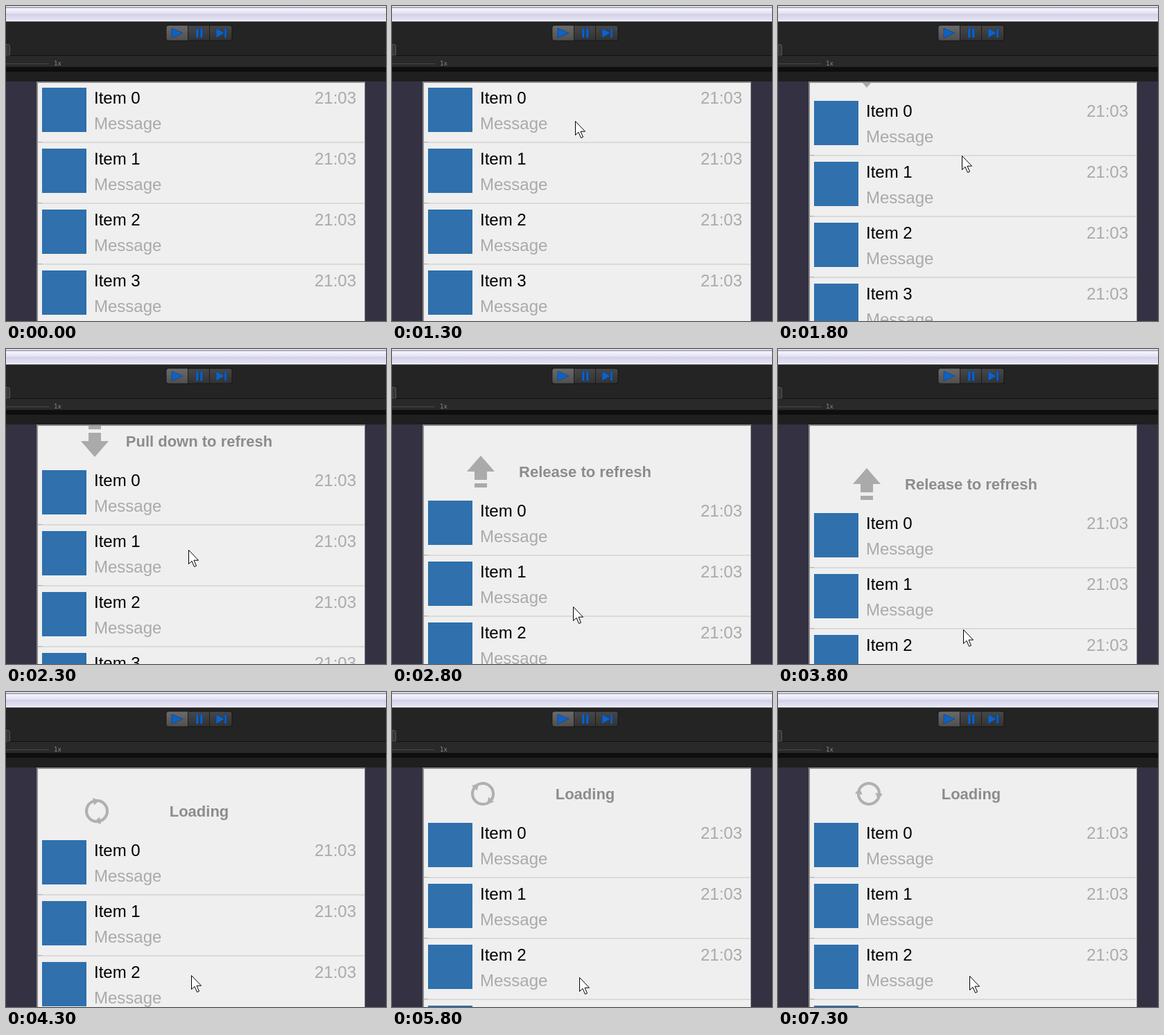
These frames come from a looping animation (548 px wide and 455 px high, 7.8 s). An HTML page:

```html
<!DOCTYPE html>
<html lang="en">
<head>
<meta charset="utf-8">
<title>Pull to refresh</title>
<style>
  html, body { margin: 0; width: 100%; height: 100%; overflow: hidden; background: #333142; }
  svg { display: block; }
  text { font-family: "Liberation Sans", Arial, sans-serif; }
  .row text { font-size: 24px; fill: #aaa; }
  .row .name { fill: #000; }
  .time { text-anchor: end; }
  .label { font-size: 22px; font-weight: bold; fill: #8c8c8c; text-anchor: middle; }
  .scale { font: 9px "DejaVu Sans Mono", monospace; fill: #8a8a8a; }
</style>
</head>
<body>
<svg width="548" height="455" viewBox="0 0 548 455">
  <defs>
    <linearGradient id="title" x2="0" y2="1">
      <stop offset="0" stop-color="#f6f6fc"/>
      <stop offset=".4" stop-color="#e4e3f2"/>
      <stop offset=".5" stop-color="#d3d1e8"/>
      <stop offset="1" stop-color="#e6e5f3"/>
    </linearGradient>
    <linearGradient id="button" x2="0" y2="1">
      <stop offset="0" stop-color="#484848"/>
      <stop offset="1" stop-color="#323232"/>
    </linearGradient>
    <linearGradient id="pressed" x2="0" y2="1">
      <stop offset="0" stop-color="#6a6a6a"/>
      <stop offset="1" stop-color="#505050"/>
    </linearGradient>
  </defs>

  <!-- Window title -->
  <g shape-rendering="crispEdges">
    <rect width="548" height="2" fill="#d8d8e6"/>
    <rect y="2" width="548" height="1" fill="#86869a"/>
    <rect y="3" width="548" height="18" fill="url(#title)"/>
    <rect y="21" width="548" height="1" fill="#fafafc"/>
    <rect y="22" width="548" height="1" fill="#686874"/>
    <rect y="23" width="548" height="48" fill="#242424"/>
    <rect y="71" width="548" height="1" fill="#101010"/>
    <rect y="72" width="548" height="16" fill="#292929"/>
    <rect y="88" width="548" height="7" fill="#0e0e0e"/>
    <rect y="95" width="548" height="14" fill="#1f1f1f"/>
    <rect y="83" width="62" height="1" fill="#484848"/>
  </g>
  <path d="M0 55.5H3Q5.500 55.500 5.500 58V71H0Z" fill="#363636" stroke="#555"/>
  <text class="scale" x="69" y="86">1x</text>

  <!-- Play controls -->
  <rect x="231" y="28" width="95" height="22" rx="3" fill="url(#button)" stroke="#141414"/>
  <path d="M262 28.500H234Q231.500 28.500 231.500 31V47Q231.500 49.500 234 49.500H262Z" fill="url(#pressed)"/>
  <path d="M262.500 28V50M293.500 28V50" stroke="#1c1c1c"/>
  <path d="M239 32L255 39L239 46ZM274 32H277.500V46H274ZM280 32H283.500V46H280ZM303 32L315 39L303 46ZM315 32H318V46H315Z"
        fill="#0f62c4" stroke="#0a3f86" stroke-width=".6"/>

  <!-- Panel -->
  <g shape-rendering="crispEdges">
    <rect x="44" y="109" width="474" height="346" fill="#888"/>
    <rect x="46" y="111" width="471" height="344" fill="#efefef"/>
  </g>
  <svg x="46" y="111" width="471" height="344" viewBox="46 111 471 344">
    <g id="list">
      <g id="arrow" fill="#aaa">
        <path d="M128 53L148 76H137V88H119V76H108ZM119 93H137V99H119Z"/>
      </g>
      <g id="spinner" fill="none" stroke="#b0b0b0" stroke-width="4"></g>
      <text class="label" id="label" x="278.500" y="84"></text>
    </g>
  </svg>
  <path id="cursor" d="M.5.5V20.500L5 16.300L8.500 24.500L11.500 23.200L8 15.200H14.500Z"
        fill="#fff" stroke="#000"/>
</svg>
<script>
  const LOOP = 7800, FIRST = 300, STEP = 500;
  const $ = id => document.getElementById(id);
  const list = $("list"), arrow = $("arrow"), spinner = $("spinner");
  const label = $("label"), cursor = $("cursor");

  // One pose per step: cursor x, cursor y, list offset
  const poses = [
    [-50, 0, 0], [259, 223, 0], [258, 175, 0], [264, 166, 0],
    [265, 216, 19], [263, 290, 57], [261, 372, 101], [264, 388, 110],
    [267, 405, 119], [267, 409, 96], [267, 409, 71], [267, 410, 71],
    [270, 412, 71], [270, 412, 71], [271, 410, 71], [276, 410, 71]
  ];
  const RELEASE = 6, LOADING = 9, TURN = 108;

  const row = i => {
    const y = 118 + 88 * i;
    return `<g class="row">
      <rect x="52" y="${y}" width="64" height="64" fill="#2f70ad"/>
      <text class="name" x="127" y="${y + 23}">Item ${i}</text>
      <text x="127" y="${y + 60}">Message</text>
      <text class="time" x="505" y="${y + 23}">21:03</text>
      <rect x="46" y="${y + 78}" width="471" height="2" fill="#dadada"/>
      <rect x="46" y="${y + 78}" width="6" height="1" fill="#b4b4b4"/>
    </g>`;
  };
  list.insertAdjacentHTML("beforeend", [0, 1, 2, 3].map(row).join(""));

  const half = `<path d="M4.500 14.500A15.200 15.200 0 0 1 -9 -12.200" transform="rotate(19)"/>
    <path d="M-6 -19L4 -15.500L-4 -8.500Z" fill="#b0b0b0" stroke="none"/>`;
  spinner.innerHTML = `<g>${half}</g><g transform="rotate(180)">${half}</g>`;

  function draw(now) {
    const t = now % LOOP;
    const i = t < FIRST ? 0 : 1 + Math.floor((t - FIRST) / STEP);
    const [x, y, offset] = poses[i];
    const loading = i >= LOADING, release = i >= RELEASE;

    list.setAttribute("transform", `translate(0 ${offset})`);
    cursor.setAttribute("transform", `translate(${x} ${y})`);
    arrow.setAttribute("visibility", loading ? "hidden" : "visible");
    arrow.setAttribute("transform", `rotate(${release ? 0 : 180} 128 76)`);
    spinner.setAttribute("visibility", loading ? "visible" : "hidden");
    spinner.setAttribute("transform", `translate(131 76) rotate(${TURN * (i - LOADING)})`);
    label.textContent = loading ? "Loading" : release ? "Release to refresh" : "Pull down to refresh";
    // The header rests above the panel until the list is pulled
    label.setAttribute("visibility", offset ? "visible" : "hidden");
  }

  const start = performance.now();
  function tick() {
    draw(performance.now() - start);
    requestAnimationFrame(tick);
  }
  tick();
</script>
</body>
</html>
```
